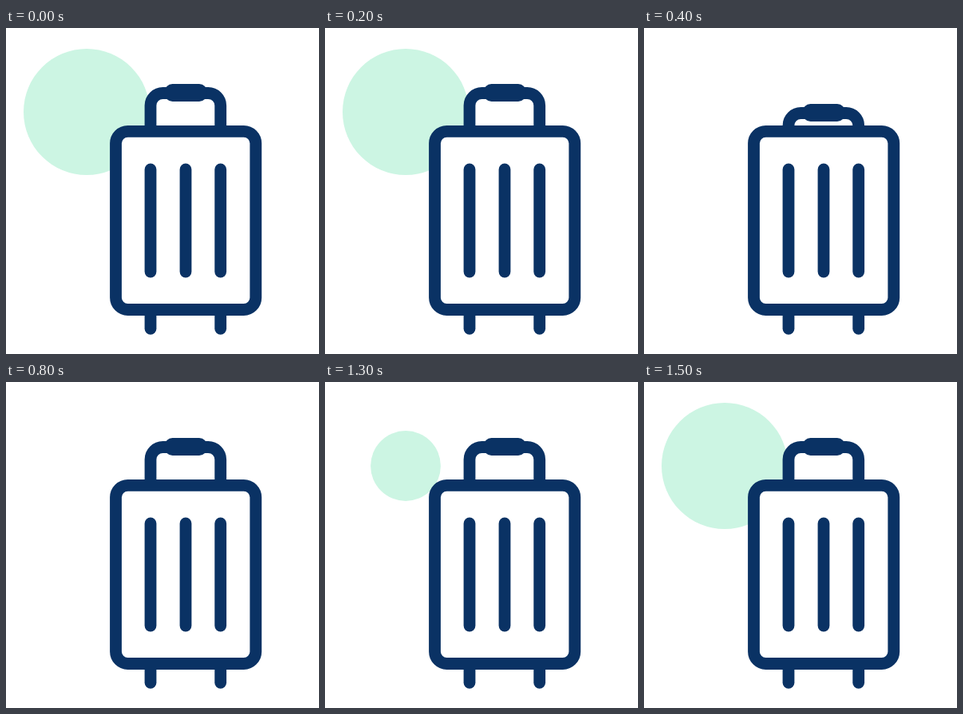
An HTML page with a canvas for the animation above (1700 ms loop, 392 by 408 pixels).

```html
<!DOCTYPE html>
<html lang="en">
<head>
<meta charset="utf-8">
<title>Suitcase</title>
<style>
  html, body { margin: 0; width: 100%; height: 100%; overflow: hidden; background: #fff; }
  canvas { display: block; }
</style>
</head>
<body>
<canvas id="stage" width="392" height="408"></canvas>
<script>
const ctx = document.getElementById('stage').getContext('2d');
const NAVY = '#0a3264', MINT = '#ccf5e3';
const LOOP = 1700, STEP = 100;
const DOT = { x: 101, y: 105, r: 79 };

function bar(x, y1, y2) {
  ctx.beginPath();
  ctx.moveTo(x, y1);
  ctx.lineTo(x, y2);
  ctx.stroke();
}

function roundBox(x, y, w, h, r) {
  ctx.beginPath();
  ctx.roundRect(x, y, w, h, r);
}

function dotRadius(t) {
  if (t < 400) return DOT.r;
  return DOT.r * Math.min(1, Math.max(0, (t - 1133.3) / 300));
}

function drawDot(r) {
  if (r <= 0) return;
  ctx.fillStyle = MINT;
  ctx.beginPath();
  ctx.arc(DOT.x, DOT.y, r, 0, Math.PI * 2);
  ctx.fill();
}

function drawHandle(drop) {
  ctx.save();
  ctx.translate(0, drop);
  ctx.beginPath();
  ctx.moveTo(181, 129);
  ctx.lineTo(181, 97);
  ctx.arcTo(181, 81.5, 197, 81.5, 15.5);
  ctx.lineTo(253, 81.5);
  ctx.arcTo(268.7, 81.5, 268.7, 97, 15.5);
  ctx.lineTo(268.7, 129);
  ctx.stroke();
  ctx.fillStyle = NAVY;
  roundBox(198.5, 70, 53.5, 22, 10);
  ctx.fill();
  ctx.restore();
}

function drawCase() {
  for (const x of [181, 268.7]) bar(x, 353, 376.3);
  ctx.fillStyle = '#fff';
  roundBox(137.5, 129.3, 175.3, 223.2, 15);
  ctx.fill();
  ctx.stroke();
  for (const x of [181, 225, 268.7]) bar(x, 177, 305);
}

function draw(t) {
  ctx.fillStyle = '#fff';
  ctx.fillRect(0, 0, 392, 408);
  ctx.strokeStyle = NAVY;
  ctx.lineWidth = 14.8;
  ctx.lineCap = 'round';
  drawDot(dotRadius(t));
  drawHandle(t >= 400 && t < 800 ? 25 : 0);
  drawCase();
}

const start = performance.now();
function tick() {
  const t = (performance.now() - start) % LOOP;
  draw(Math.floor(t / STEP) * STEP);
  requestAnimationFrame(tick);
}
tick();
</script>
</body>
</html>
```
